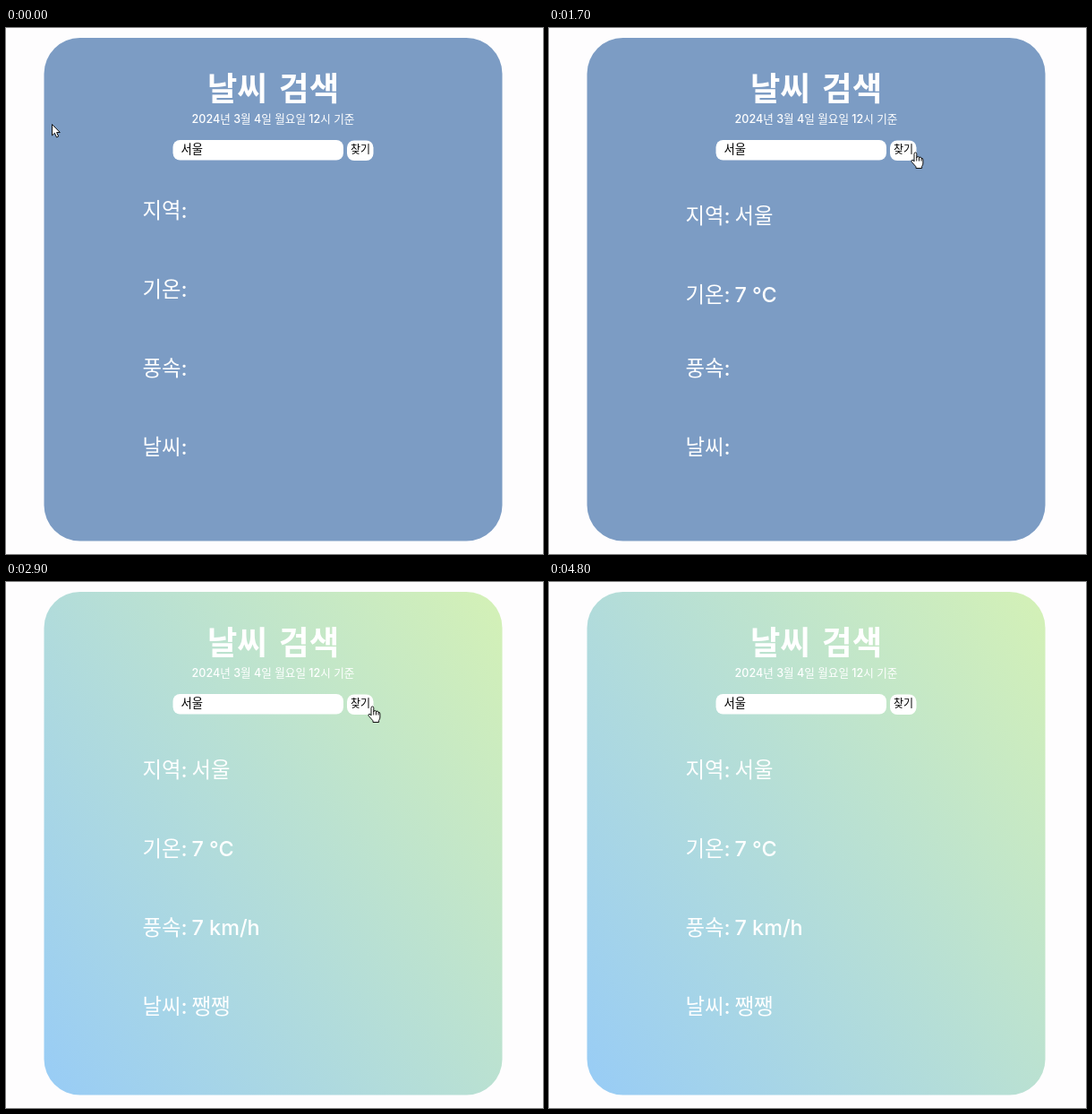
These frames come from a looping animation (600 px wide and 587 px high, 5 s). An HTML page:

```html
<!DOCTYPE html>
<html lang="ko">
<head>
<meta charset="utf-8">
<title>날씨 검색</title>
<style>
  html, body { margin: 0; width: 100%; height: 100%; overflow: hidden; background: #fefdfe; }
  svg { display: block; width: 100vw; height: 100vh; }
  text { font-family: Inter, "Noto Sans CJK KR", "Noto Sans CJK", sans-serif; font-weight: 500; fill: #fff; white-space: pre; }
  .title { font-size: 36.5px; font-weight: 700; word-spacing: 4.5px; text-anchor: middle; }
  .date { font-size: 12.6px; text-anchor: middle; }
  .row { font-size: 23.4px; }
  .field { font-size: 13.3px; fill: #000; }
  .button { font-size: 12px; fill: #000; text-anchor: middle; }
  .cursor path { fill: #fff; stroke: #111; stroke-width: 1; stroke-linejoin: round; }
</style>
</head>
<body>
<svg viewBox="0 0 600 587">
  <defs>
    <linearGradient id="sunny" gradientUnits="userSpaceOnUse" x1="-5.5" y1="504" x2="602.5" y2="80">
      <stop offset="0" stop-color="#98ccf6"/>
      <stop offset="1" stop-color="#d4f1b6"/>
    </linearGradient>
  </defs>
  <rect id="card" x="42.5" y="11" width="512" height="561.5" rx="40"/>
  <text class="title" x="298.5" y="81">날씨 검색</text>
  <text class="date" x="298.5" y="106">2024년 3월 4일 월요일 12시 기준</text>
  <rect x="186.5" y="125" width="190.5" height="22.5" rx="8" fill="#fff"/>
  <text class="field" x="195.5" y="140">서울</text>
  <path id="caret" d="M220.5 128.5V143.5" stroke="#000"/>
  <rect x="381" y="125.5" width="29.5" height="22.5" rx="8" fill="#fff"/>
  <text class="button" x="396" y="139.7">찾기</text>
  <g id="rows"></g>
  <g id="arrow" class="cursor">
    <path d="M0 0V12.4L2.9 9.8 5 14.5 7.2 13.5 5.1 9H8.8Z"/>
  </g>
  <g id="hand" class="cursor" transform="translate(404 138)">
    <path d="M4 11V2.6Q4 .9 5.4 .9T6.8 2.6V7Q7 5.3 8.3 5.4T9.5 7Q9.8 5.9 11 6.1T12 7.6Q13.9 6.8 13.9 9V13Q13.9 15 12.6 16.4V18.5H6V16.8L1.2 11.4Q.5 9.7 1.8 9.4 3 9.3 4 11Z"/>
    <path d="M6.8 7V10.5M9.5 7V10.5M12 7.6V10.5" style="fill:none"/>
  </g>
</svg>
<script>
const LOOP = 5000, STEP = 100;
const SUNNY_AT = 2400;
const $ = id => document.getElementById(id);
const show = (el, on) => el.setAttribute('visibility', on ? 'visible' : 'hidden');

function addText(x, content) {
  const el = document.createElementNS('http://www.w3.org/2000/svg', 'text');
  el.setAttribute('class', 'row');
  el.setAttribute('x', x);
  el.textContent = content;
  $('rows').append(el);
  return el;
}

const rows = [
  ['지역:', '서울', 800],
  ['기온:', '7 °C', 1700],
  ['풍속:', '7 km/h', 2100],
  ['날씨:', '쨍쨍', SUNNY_AT],
].map(([label, value, at], i) => ({
  label: addText(152.5, label), value: addText(207.5, value), at, y: 212 + 88 * i,
}));

const smooth = p => p * p * (3 - 2 * p);

function draw(t) {
  $('card').setAttribute('fill', t < SUNNY_AT ? '#7c9cc4' : 'url(#sunny)');
  show($('caret'), t >= 200 && t < 700);

  for (const { label, value, at, y } of rows) {
    const loaded = t >= at;
    // a filled row sits slightly lower than an empty one
    for (const el of [label, value]) el.setAttribute('y', loaded ? y + 5.5 : y);
    show(value, loaded);
  }

  const hovering = t >= 600 && t < 3200;
  const p = smooth(Math.min(t / 600, 1));
  const [x, y] = t < 600 ? [51.5 + 357 * p, 107.5 + 31.5 * p] : [405, 138.5];
  $('arrow').setAttribute('transform', `translate(${x} ${y})`);
  show($('arrow'), !hovering && t < 4200);
  show($('hand'), hovering);
}

const start = performance.now();
function tick() {
  const t = (performance.now() - start) % LOOP;
  draw(Math.floor(t / STEP) * STEP);
  requestAnimationFrame(tick);
}
tick();
</script>
</body>
</html>
```
